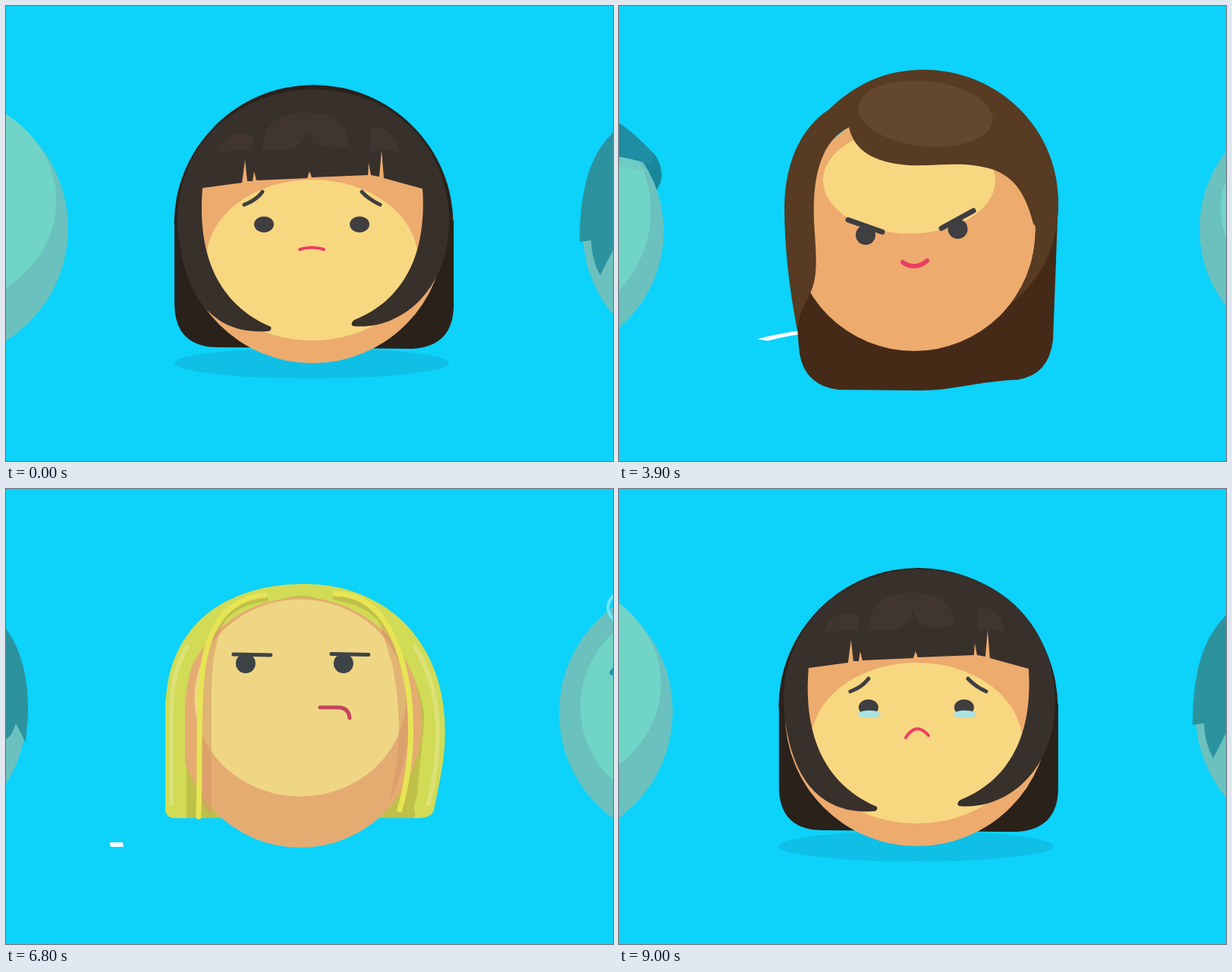
Write an HTML page that moves like this. It is 800 by 600 pixels and loops after 9.1 s.

```html
<!DOCTYPE html>
<html lang="en">
<head>
<meta charset="utf-8">
<title>Faces carousel</title>
<style>
html, body { margin: 0; width: 100%; height: 100%; overflow: hidden; background: #0dd2fa; }
svg { display: block; width: 100vw; height: 100vh; }
</style>
</head>
<body>
<svg id="stage" viewBox="0 0 800 600"></svg>
<script>
const INK = '#3f3e40', PINK = '#ea3f63', SKIN = '#edab6e', LIGHT = '#f8d781';
const BLACK = '#38302b', BLACK2 = '#2a211b', BROWN = '#573b22', BROWN2 = '#452a18', BROWN3 = '#63472f';
const LOOP = 9100, STEP = LOOP / 9;

const oval = (x, y, rx, ry, fill, more = '') =>
  `<ellipse cx="${x}" cy="${y}" rx="${rx}" ry="${ry}" fill="${fill}" ${more}/>`;
const dot = (x, y, r, fill = INK) => oval(x, y, r, r, fill);
const shape = (d, fill, more = '') => `<path d="${d}" fill="${fill}" ${more}/>`;
const line = (d, w, color = INK, more = '') =>
  `<path d="${d}" fill="none" stroke="${color}" stroke-width="${w}" stroke-linecap="round" stroke-linejoin="round" ${more}/>`;
const block = (x, y, w, h, r, fill) =>
  `<rect x="${x}" y="${y}" width="${w}" height="${h}" rx="${r}" fill="${fill}"/>`;
const shadow = (x, y, rx) => oval(x, y, rx, 20, '#10bfe6');
const head = (x, y, r, lx, ly, lrx, lry) => dot(x, y, r, SKIN) + oval(lx, ly, lrx, lry, LIGHT);
const at = (x, y, s) => `translate(${x} ${y}) scale(${s})`;

const heart = `<g class="heart">
  ${shape('M0,39 C-10,29 -47,12 -47,-13 C-47,-42 -9,-47 0,-24 C9,-47 47,-42 47,-13 C47,12 10,29 0,39Z', PINK)}
  ${shape('M0,27 C-10,19 -41,6 -41,-15 C-41,-38 -6,-41 0,-20 C6,-41 41,-38 41,-15 C41,6 10,19 0,27Z', '#f95d78')}
  ${oval(-20, -21, 15, 10, '#ff7b90')}${oval(20, -21, 15, 10, '#ff7b90')}</g>`;

const sprinkles = [[331, 124, 5], [348, 111, 5], [369, 105, 40], [380, 94, 60], [407, 91, 75],
  [425, 92, 110], [437, 99, 100], [464, 114, 65], [482, 121, 95]]
  .map(([x, y, a], i) => `<rect x="${-5 - i % 2 * 2}" y="-2.5" width="${10 + i % 2 * 4}" height="5" rx="2" fill="#fff" transform="translate(${x} ${y}) rotate(${a})"/>`).join('');

const blondOutline = `M211,422 V290 C213,180 290,125 395,125 C500,125 580,200 580,320 C580,360 570,395 565,425
  Q560,434 545,434 H225 Q211,434 211,422Z`;

// Each person: floor shadow, body, facial features, height of the hop.
const people = [
  { hop: 0, floor: shadow(403, 471, 181),
    body: shape('M222,283 V394 Q223,450 280,450 L535,452 Q590,449 590,394 V283Z', BLACK2) +
      shape('M221.5,288 A184,184 0 0 1 589.5,288Z', BLACK2) + head(404, 297, 174, 403.5, 335, 139.5, 106) +
      '<g id="bob">' +
      shape(`M259,240 C252,325 277,392 349,423 Q351,429 344,429 C275,433 234,388 226,290
        C222,180 310,110 405,110 C505,110 586,180 584,290 C580,382 515,428 457,422 Q453,418 459,414
        C523,388 555,330 549,241 L498,227 495,190 492,225 481,223 478,207 477,223 403,226 400,218 397,227
        330,230 327,218 325,231 318,231 315,203 311,233Z`, BLACK) +
      shape('M278,194 Q284,172 306,169 Q326,168 326,174 L325,191 Q300,190 278,194Z M338,190 Q338,141 395,140 Q450,141 452,185 Q415,190 404,180 L396,164 Q392,190 365,190Z M481,192 V164 Q486,157 500,163 Q514,172 519,194 L498,188Z', '#403531') + '</g>',
    face: oval(340, 288, 13, 10.5, INK) + oval(466, 288, 13, 10.5, INK) +
      line('M314,262 Q330,256 338,245 M469,245 Q478,255 493,262', 5, INK, 'id="brows"') + line('', 4, PINK, 'id="frown"') +
      `<g id="tears">${oval(341, 297, 15, 5, '#a9e2df')}${oval(467, 297, 15, 5, '#a9e2df')}</g>
       <g id="drops">${oval(341, 300, 5, 7, '#bdeaf0')}${oval(467, 300, 5, 7, '#bdeaf0')}</g>` },

  { hop: 25, floor: shadow(404, 455, 90) + oval(408, 467, 26, 3.5, '#8fdcd0'),
    body: shape(`M329,135 L326,121 340,121 339,108 355,112 365,110 363,99 377,104 371,82 388,97 395,99
      404,78 412,97 420,96 426,86 430,97 441,88 440,106 452,112 463,107 469,119 485,113 484,135Z`, '#e2e04b') +
      sprinkles + head(405.5, 293, 175.5, 405.5, 257, 160, 141),
    face: `<g id="plain">${dot(335, 239, 13)}${dot(475, 239, 13)}</g>` + heart + heart +
      shape('M346,303 H465 Q471,303 470,309 C466,337 440,353 405,353 C370,353 345,337 341,309 Q341,303 346,303Z', INK) +
      block(382, 303, 22, 19, 4, '#fff') + block(409, 303, 19, 16, 4, '#fff') },

  { hop: 10, floor: shadow(404, 462, 90),
    body: head(404, 294, 166, 404, 268, 138, 119),
    face: dot(350, 262, 13) + dot(458, 262, 13) + line('M334,235 Q348,222 363,231 M445,231 Q460,222 474,235', 5) +
      oval(404, 330, 15, 19, INK) },

  { hop: 4, floor: '', shift: 12,
    body: shape(`M219,270 L236,425 238,450 Q242,500 290,506 L400,507 C440,507 480,494 525,493
        Q568,487 573,440 L580,255Z`, BROWN2) + shape('M304,155 L250,240 V300 H340Z', SKIN) +
      head(390, 295, 160, 383.5, 230, 113.5, 70) +
      shape(`M236,428 Q219,340 219,265 C220,200 245,158 277,137 C310,105 350,84 402,84 C500,84 578,160 580,255
        Q582,340 518,393 Q550,350 550,290 Q547,289 545,280 C535,245 521,226 495,216 C455,203 420,212 382,210
        C335,206 311,190 304,160 C262,180 254,240 259,300 C262,345 262,362 250,385 Q238,405 236,428Z`, BROWN) +
      oval(405, 142, 89, 43, BROWN3, 'transform="rotate(6 405 142)"'),
    face: dot(326, 302, 13) + dot(447.5, 294, 13) + line('M303,282 L348,298 M426,293 L468,270', 7) +
      line('M375,338 Q391,349 407,336', 6, PINK) },

  { hop: 20, floor: shadow(404, 464, 90),
    body: shape('M251,194 Q240,208 240,224 Q241,236 248,242 H562 Q569,232 568,220 Q567,206 558,194Z', BLACK2) +
      head(404, 297, 167, 402, 270, 152, 153) +
      shape('M266,203 Q405,173 540,203 L545,217 Q405,188 262,217Z', SKIN, 'opacity=".45"') +
      shape(`M251,196 C295,148 340,120 404,120 C470,120 515,148 559,196 L554,209 Q500,191 405,190 L400,167 396,190
        385,191 383,177 381,191 371,191 367,159 363,191 Q310,191 258,209Z`, BLACK) +
      shape('M297,180 Q307,145 352,141 Q357,150 353,178Z M386,163 V141 Q392,134 415,136 Q470,141 478,170 L413,164 402,150Z', '#453a38'),
    face: line('M298,227 Q314,203 338,216 M462,216 Q486,203 500,227', 8) +
      line('M311,272 C309,248 338,248 340,269 M454,269 C456,248 484,250 485,271', 5) +
      shape('M333,321 C338,350 365,367 400,367 C435,367 452,347 463,321Z', INK) + block(392, 307, 14, 17, 0, INK) +
      block(333, 308, 61, 15, 6, '#fff') + block(404, 308, 60, 15, 6, '#fff') },

  { hop: 12, floor: shadow(404, 464, 90),
    body: head(404, 295, 172, 413, 287, 153, 140) +
      line('M504,140 Q522,160 497,178 M304,140 Q286,160 311,178 M404,124 Q386,106 404,98 Q420,96 416,110', 4, '#fff'),
    face: line('M302,242 Q320,222 342,232 M466,232 Q488,222 504,242', 7) + dot(328, 270, 13) + dot(480, 270, 13) +
      line('M370,335 Q404,362 438,335', 6, PINK) },

  { hop: 8, floor: '', shift: 12,
    body: `<clipPath id="blond"><path d="${blondOutline}"/></clipPath><g clip-path="url(#blond)">` +
      shape(blondOutline, '#d9dc51') +
      shape('M239,434 V300 Q260,160 390,140 Q530,160 553,300 L540,434Z', '#c6c043') + '</g>' +
      oval(389, 308, 160, 165, SKIN) + oval(389, 275.5, 139.5, 130, LIGHT) +
      shape('M259,415 V230 Q268,180 300,160 Q272,190 272,270 V430Z M490,165 Q522,200 533,270 Q538,350 505,415 Q530,330 510,230Z', '#dc9662', 'opacity=".55"') +
      '<g clip-path="url(#blond)">' +
      line('M224,422 V290 Q228,195 285,158', 26, '#d9dc51') + line('M552,420 C573,350 568,300 558,255 Q545,195 497,160', 26, '#d9dc51') + '</g>' +
      line('M219,415 V290 Q220,240 240,208 M558,415 C580,330 571,255 540,208', 6, '#e4e372') +
      line('M343,145 Q305,149 286,173 M435,143 Q480,150 501,179', 7, '#c6c043') +
      line('M255,432 C258,350 252,260 266,210 Q284,145 342,140 M435,138 C490,138 520,190 532,270 Q541,350 520,423', 7, '#efe64f'),
    face: dot(317, 230, 13) + dot(446, 230, 13) + line('M301,218 L350,219 M430,217.5 L479,218.5', 5) +
      line('M415,288 H436 Q453,287 454,302', 5, '#cc4058') },

  { hop: -8, floor: '',
    body: head(403, 297, 170, 404.5, 290, 138, 112) +
      shape(`M229,311 C229,250 240,200 270,170 C295,130 345,112 402,112 C465,112 512,135 537,175 C565,200 577,250 575,300
        L572,334 559,309 Q555,324 547,330 L537,306 Q527,287 505,287 Q484,290 484,308 Q460,306 439,289
        Q390,294 334,281 Q290,296 272,324 L256,355 Q245,335 244,309Z`, BROWN) +
      oval(403.5, 188, 131, 69, BROWN3) + oval(403, 170, 91, 50, BROWN),
    face: dot(339, 389, 13.5) + dot(465.5, 389, 13.5) +
      line('M314,362 Q331,357 338,345 M467,345 Q474,356 491,362', 5) + line('M387,424 Q402,411 418,424', 5) }
];

const stage = document.getElementById('stage');
stage.innerHTML = '<path id="ring" fill="#fff"/>' + people.map(p =>
  `<g class="person">${p.floor}<g class="body">${p.body}<g class="face">${p.face}</g></g></g>`).join('');
const $ = id => document.getElementById(id);
const all = name => [...stage.querySelectorAll(name)];
const groups = all('.person'), bodies = all('.body'), faces = all('.face'), hearts = all('.heart');

const clamp = x => Math.max(0, Math.min(1, x));
const smooth = (a, b, x) => { x = clamp((x - a) / (b - a)); return x * x * (3 - 2 * x); };

// Crescent ring, swept from the left over the back, later wiped the same way.
function ringPath(v) {
  const grow = clamp((v + 285) / 330), wipe = smooth(230, 520, v);
  const len = Math.max(7, 360 * grow ** 1.6) * (1 - wipe);
  if (v < -285 || wipe === 1) return '';
  const start = 172 + 98 * grow + 360 * wipe, edge = [[], []];
  for (let i = 0; i <= 90; i++) {
    const a = (start + len * i / 90) * Math.PI / 180;
    edge[0].push([407.5 + 270.5 * Math.cos(a), 467 + 50 * Math.sin(a)]);
    edge[1].unshift([407 + 253 * Math.cos(a), 467 + 46 * Math.sin(a)]);
  }
  return 'M' + edge.flat().map(p => p.map(n => n.toFixed(1))).join('L') + 'Z';
}

function draw(t) {
  // The first person stays for two beats, the others for one.
  const n = Math.floor(t / STEP), u = t - n * STEP;
  const slide = n ? smooth(580, 735, u) : 0;
  const place = Math.max(0, n - 1) + slide;
  // After the fast slide the neighbours settle first, the middle one last.
  const settle = slide * (1 - smooth(735, 870, u)), late = slide * (1 - smooth(880, STEP, u));

  groups.forEach((g, i) => {
    const d = ((place - i + 12) % 8) - 4, side = clamp(Math.abs(d));
    const lag = 13 * late * (d > 0 ? 1 - side : 1) + side * (d < 0 ? 34 : 30) * settle;
    const x = d * (d < 0 ? 499 : 527) + (people[i].shift || 0) - lag;
    g.setAttribute('transform', `translate(${x} 0)`);
    g.setAttribute('opacity', 1 - 0.58 * side - 0.034 * settle * (1 - side));
    const lively = side < 0.02 ? Math.sin(Math.PI * clamp((u - 115) / 450)) ** 2 : 0;
    bodies[i].setAttribute('transform', `translate(0 ${-people[i].hop * lively})`);
    faces[i].setAttribute('transform', `translate(0 ${-people[i].hop * lively * 0.4})`);
  });

  const owner = n + (u > 700);
  $('ring').setAttribute('d', owner > 1 && owner < 9 ? ringPath(u > 700 ? u - STEP : u) : '');

  const cry = t > 8500 ? 1 : smooth(100, 500, t);
  $('frown').setAttribute('d', `M${387 + 2 * cry},${321 + 7 * cry} Q403,${316 - 10 * cry} 419,${321 + 4 * cry}`);
  $('brows').setAttribute('transform', `translate(${2 * cry} ${5 * cry})`);
  $('bob').setAttribute('transform', `translate(${2 * cry} ${-4 * cry})`);
  $('tears').setAttribute('opacity', cry);
  const fall = t > 500 && t < 2000 ? (t - 500) % 500 / 500 : 0;
  $('drops').setAttribute('opacity', fall ? 1 - fall * 0.6 : 0);
  $('drops').setAttribute('transform', `translate(0 ${110 * fall * fall})`);

  // The hearts last until their owner has left the stage.
  const love = t - 2 * STEP;
  const pop = (smooth(0, 250, love) + 0.15 * Math.sin(Math.PI * clamp((love - 100) / 400))) * (love < 3 * STEP);
  $('plain').setAttribute('opacity', pop > 0.1 ? 0 : 1);
  hearts.forEach((h, i) => h.setAttribute('transform', at(335 + 139.5 * i, 239, pop)));
}

function frame(now) {
  draw(Math.floor(now % LOOP / 100) * 100);
  requestAnimationFrame(frame);
}
draw(0);
requestAnimationFrame(frame);
</script>
</body>
</html>
```
